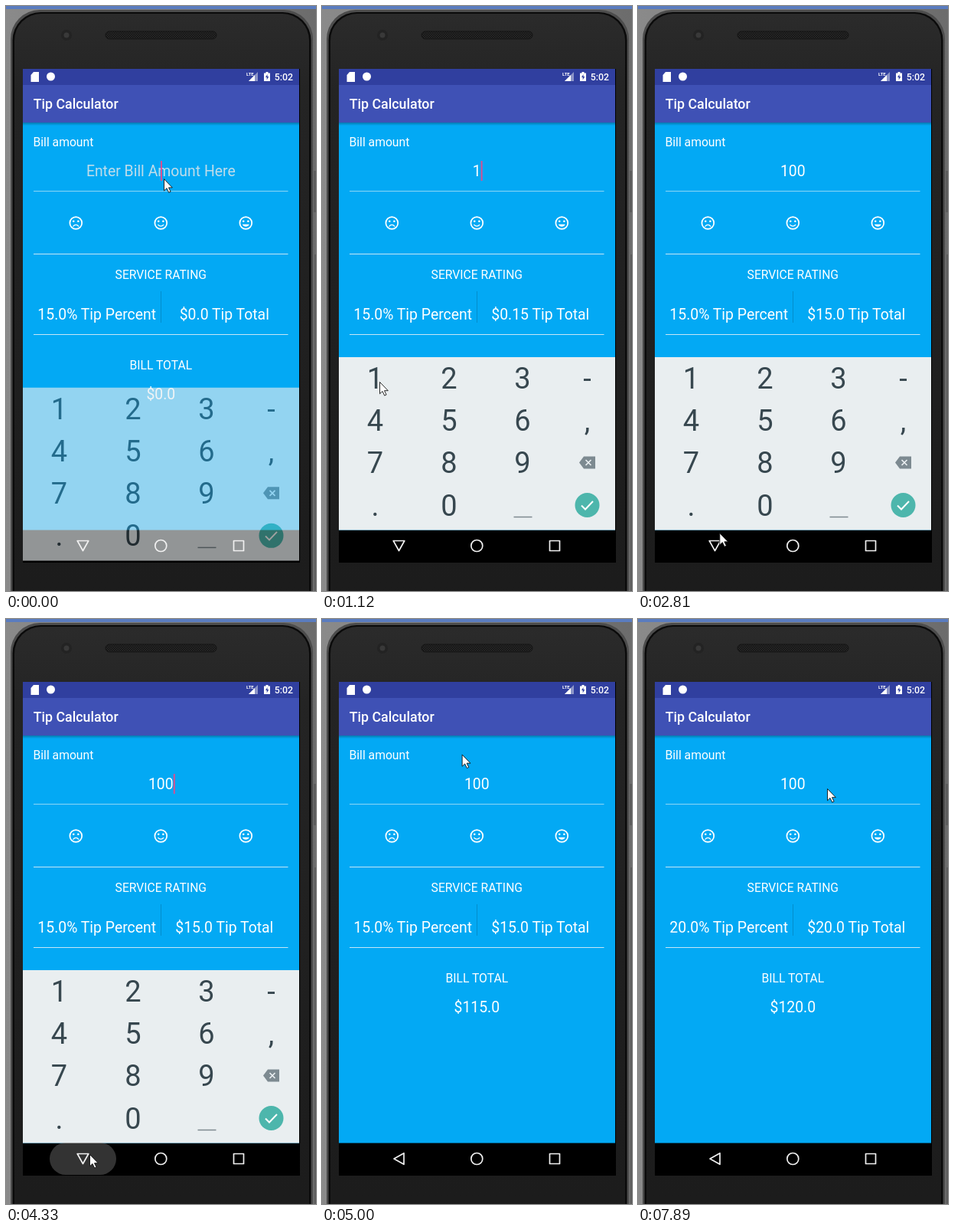
Animation of 405x763 px, one loop 8000 ms. Source, as an HTML page:

```html
<!DOCTYPE html>
<html lang="en">
<head>
<meta charset="utf-8">
<title>Tip Calculator</title>
<style>
  html, body { margin: 0; width: 100%; height: 100%; overflow: hidden; background: #7e7e7e; }
  svg { display: block; width: 405px; height: 763px; }
  text { font-family: Roboto, sans-serif; fill: #fff; }
  .label { font-size: 15.7px; }
  .value { font-size: 19.4px; }
  .mid { text-anchor: middle; }
  .nav { fill: none; stroke: #f0f0f0; stroke-width: 1.7; stroke-linejoin: round; }
  #keys text { fill: #37474f; font-size: 38px; text-anchor: middle; }
</style>
</head>
<body>
<svg viewBox="0 0 405 763">
  <defs>
    <linearGradient id="side"><stop offset="0" stop-color="#8a8a8a"/><stop offset="1" stop-color="#6c6c6c"/></linearGradient>
    <linearGradient id="body" x2="0" y2="1"><stop offset="0" stop-color="#2b2b2b"/><stop offset=".12" stop-color="#242424"/><stop offset="1" stop-color="#1b1b1b"/></linearGradient>
    <linearGradient id="shade" x2="0" y2="1"><stop offset="0" stop-opacity=".28"/><stop offset="1" stop-opacity="0"/></linearGradient>
    <pattern id="mesh" width="3" height="3" patternUnits="userSpaceOnUse">
      <path d="M0 0h3v3H0z" fill="#111"/><path d="M0 0h1.5v1.5H0zM1.5 1.5H3V3H1.5z" fill="#2b2b2b"/>
    </pattern>
    <g id="face" fill="#fff">
      <circle r="9" fill="none" stroke="#fff" stroke-width="2"/>
      <circle cx="-3.5" cy="-2.5" r="1.5"/><circle cx="3.5" cy="-2.5" r="1.5"/>
    </g>
  </defs>

  <!-- phone -->
  <path d="M0 0h405v763H0z" fill="url(#side)"/>
  <path d="M0 0h405v4H0z" fill="#5a7cbf"/>
  <path d="M402 215h3v54h-3zM403 324h2v439h-2z" fill="#5c5c5c"/>
  <rect x="6" y="5" width="395" height="820" rx="38" fill="#4c4c4c"/>
  <rect x="8.500" y="8" width="390" height="820" rx="37" fill="#0a0a0a"/>
  <rect x="11" y="10" width="385" height="820" rx="35" fill="url(#body)"/>
  <rect x="130" y="33" width="145" height="10" rx="5" fill="url(#mesh)" stroke="#151515"/>
  <circle cx="79" cy="38" r="7" fill="#232323"/><circle cx="79" cy="38" r="3.500" fill="#393939"/>

  <!-- screen -->
  <path d="M22 82h362v644H22z"/>
  <path d="M22 152h361v531.600H22z" fill="#03a9f4"/>
  <path d="M22 152h361v4H22z" fill="url(#shade)"/>
  <path d="M22 82h361v21H22z" fill="#303f9f"/>
  <path d="M22 103h361v49H22z" fill="#3f51b5"/>
  <path d="M36 86h7v13H32.500V90z" fill="#fff"/>
  <circle cx="58.500" cy="92" r="5.500" fill="#fff"/>
  <path d="M329 86v12h-12z" fill="#8c95c8"/><path d="M325 90v8h-8z" fill="#fff"/>
  <text x="314" y="91" font-size="6" font-weight="700">LTE</text>
  <path d="M339.500 86h3v1.500h2.500V98h-8V87.500h2.500z" fill="#fff"/>
  <path d="M341.500 89l-2.500 4h1.700v3.500l2.600-4.500h-1.800z" fill="#303f9f"/>
  <text x="350.800" y="97" font-size="12.300" font-weight="500">5:02</text>
  <text x="35.700" y="134.200" font-size="17.800" font-weight="500">Tip Calculator</text>

  <text x="35.500" y="183" class="label">Bill amount</text>
  <text id="bill" x="202.300" y="222" class="value mid"></text>
  <path id="caret" d="M0 202h2v26h-2z" fill="#ff4081" fill-opacity=".85"/>
  <path d="M36 241.500h332.500" stroke="#8dd6f5"/>
  <path d="M36 323.500h332.500M36 428.500h332.500" stroke="#c6e6f6"/>
  <path d="M202.500 372v41" stroke="#000" stroke-opacity=".16"/>
  <g transform="translate(91.300 283) scale(.878)"><use href="#face"/><path d="M-4.400 5.300Q0 .2 4.400 5.300" fill="none" stroke="#fff" stroke-width="1.500"/></g>
  <g transform="translate(202.300 283) scale(.878)"><use href="#face"/><path d="M-4.400 2.400Q0 7 4.400 2.400" fill="none" stroke="#fff" stroke-width="1.500"/></g>
  <g transform="translate(313.300 283) scale(.878)"><use href="#face"/><path d="M-5.100 2H5.100C4.300 4 2.300 5.500 0 5.500S-4.300 4-5.100 2z" fill="#fff"/></g>
  <text x="202.300" y="355.500" class="label mid">SERVICE RATING</text>
  <text id="percent" x="118.700" y="409" class="value mid"></text>
  <text id="tip" x="285.300" y="409" class="value mid"></text>
  <text x="202.300" y="474" class="label mid">BILL TOTAL</text>
  <text id="total" x="202.300" y="513" class="value mid"></text>

  <rect id="ripple" x="57" y="683" width="87" height="42" rx="21" fill="#333"/>
  <g id="keyboard">
    <path d="M22 458h361v225.600H22z" fill="#e9eef0"/>
    <path id="press" d="M121 630h90v41.500h-90z" fill="#cfd5d8"/>
    <g id="keys"></g>
    <path d="M250.500 666.500h24" stroke="#7d898f" stroke-width="1.500"/>
    <path d="M342 587.500h15v16h-15l-6-8z" fill="#7d8a91"/>
    <path d="M344.500 592l7 7m0-7l-7 7" stroke="#e9eef0" stroke-width="1.700"/>
    <circle cx="346.500" cy="651" r="16" fill="#4db6ac"/>
    <path d="M339 651.500l5 5 10-10.500" fill="none" stroke="#fff" stroke-width="2"/>
  </g>
  <path id="back" class="nav" d="M94 704l13-7.300v14.600z"/>
  <circle class="nav" cx="202.300" cy="704" r="7.500"/>
  <path class="nav" d="M297.500 697.500h13v13h-13z"/>
  <path id="pointer" d="M.5.5v15.300l3.500-3.300 2.700 5.600 2.400-1.100-2.600-5.300h4.800z" fill="#fff" stroke="#111" stroke-width=".9"/>
</svg>
<script>
const $ = id => document.getElementById(id);
const set = (id, attrs) => { for (const k in attrs) $(id).setAttribute(k, attrs[k]); };

const columns = [69.5, 166, 262, 346.5];
['123-', '456,', '789', '.0'].forEach((row, r) => [...row].forEach((key, c) => {
  $('keys').innerHTML += `<text x="${columns[c]}" y="${499 + r * 55.2}">${key}</text>`;
}));

// Places where the pointer comes to rest: arrival in ms, x, y.
const stops = [
  [0, 206, 225], [150, 206, 239], [540, 113, 602], [810, 75, 490], [1790, 171, 647],
  [2960, 100, 691], [3400, 109, 698], [5000, 183, 176], [5500, 93, 279],
  [6160, 205, 271], [7100, 295, 274], [7890, 247, 221]
];
const moveTime = 500;
const keyTimes = [1110, 2030, 2400];
const rateTimes = [5600, 6400, 7350];
const backTime = 4330, closeTime = 4400;

const ramp = (t, from, to) => Math.min(1, Math.max(0, (t - from) / (to - from)));
const passed = (times, t) => times.filter(time => time <= t).length;
const money = n => '$' + (Number.isInteger(n) ? n.toFixed(1) : +n.toFixed(2));

function pointerAt(t) {
  const next = stops.findIndex(stop => stop[0] > t);
  if (next < 0) return stops.at(-1).slice(1);
  const [left, x0, y0] = stops[next - 1], [arrive, x1, y1] = stops[next];
  const p = 1 - (1 - ramp(t, Math.max(left, arrive - moveTime), arrive)) ** 2;
  return [x0 + (x1 - x0) * p, y0 + (y1 - y0) * p];
}

function draw(t) {
  const bill = '100'.slice(0, passed(keyTimes, t));
  const taps = passed(rateTimes, t);
  const rate = taps ? 5 + 5 * taps : 15;
  const tip = bill * rate / 100;
  const shown = ramp(t, -250, 150) - ramp(t, closeTime, 4560);
  const zeroHeld = keyTimes.slice(1).some(time => t >= time - 120 && t < time + 150);
  const blinkStart = bill ? keyTimes[0] : -400;
  const [x, y] = pointerAt(t);

  $('bill').textContent = bill || 'Enter Bill Amount Here';
  $('bill').style.fill = bill ? '#fff' : '#bfdcea';
  $('percent').textContent = rate.toFixed(1) + '% Tip Percent';
  $('tip').textContent = money(tip) + ' Tip Total';
  $('total').textContent = money(+bill + tip);

  set('caret', {
    transform: `translate(${202 + bill.length * 5.6} 0)`,
    opacity: (t - blinkStart) % 1000 < 500 ? 1 : 0
  });
  set('keyboard', { transform: `translate(0 ${107 * (1 - shown)})`, opacity: shown });
  set('press', { opacity: zeroHeld ? 1 : 0 });
  set('ripple', { opacity: t < backTime ? 0 : 1 - ramp(t, closeTime, 4850) });
  set('back', { transform: `rotate(${shown > 0 ? -90 : 0} 100.5 704)` });
  set('pointer', { transform: `translate(${x} ${y})` });
}

const start = performance.now();
function frame() {
  draw((performance.now() - start) % 8000);
  requestAnimationFrame(frame);
}
frame();
</script>
</body>
</html>
```
